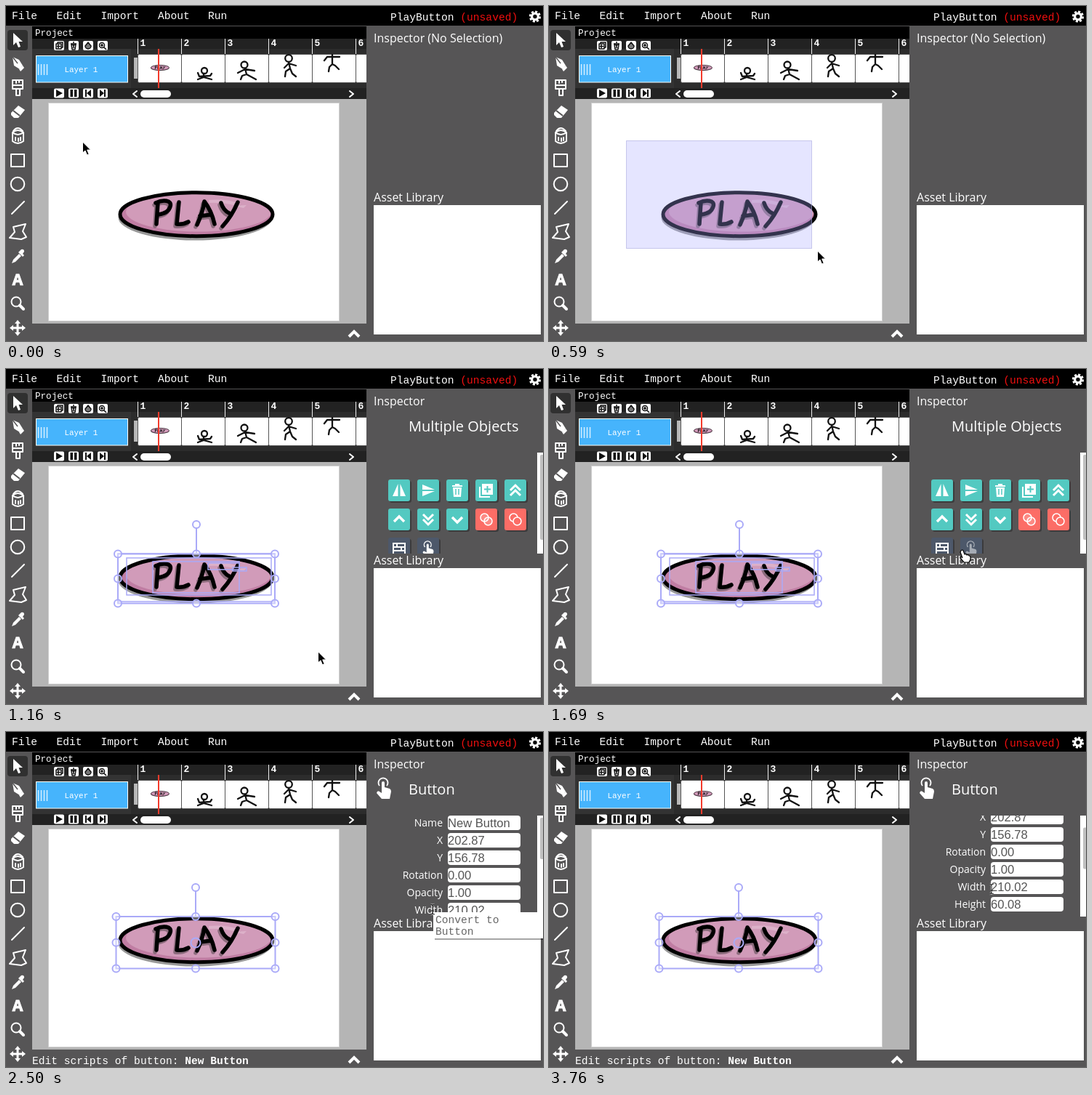
These frames come from a looping animation (739 by 461 pixels, 3880 ms). An HTML page:

```html
<!DOCTYPE html>
<html lang="en">
<head>
<meta charset="utf-8">
<title>Button editor</title>
<style>
html, body { margin: 0; width: 100%; height: 100%; overflow: hidden; background: #565556; }
svg { display: block; }
text { white-space: pre; }
.mono { font: 14.6px "Liberation Mono", monospace; fill: #fff; }
.sans { font: 16px "Open Sans", sans-serif; fill: #fff; }
.title { font-size: 20px; }
.label { font-size: 14px; text-anchor: end; }
.value { font: 16.6px "Liberation Sans", Arial, sans-serif; fill: #555; }
.num { font: bold 13px "Liberation Mono", monospace; fill: #fff; }
.line { fill: none; stroke: #fff; stroke-width: 2; stroke-linecap: round; stroke-linejoin: round; }
.dark { fill: none; stroke: #111; stroke-width: 1.5; stroke-linejoin: round; }
.stick { fill: none; stroke: #111; stroke-width: 2.3; stroke-linecap: round; stroke-linejoin: round; }
.sel { fill: none; stroke: #aaaaf8; stroke-width: 2; }
.thin { stroke-width: 1.5; }
</style>
</head>
<body>
<svg width="739" height="461" viewBox="0 0 739 461">
<defs>
  <clipPath id="panelClip"><rect x="500" y="115" width="239" height="139"/></clipPath>
  <clipPath id="frameClip"><rect x="172" y="66" width="324" height="40"/></clipPath>
  <clipPath id="faceClip"><ellipse cx="262" cy="286.700" rx="104" ry="29"/></clipPath>
  <g id="letters" fill="none" stroke-width="5.500" stroke-linecap="round" stroke-linejoin="round">
    <path d="M209 271L207 300M206 271C216 266 229 267 226 276C224 283 217 286 210 287"/>
    <path d="M238 270L235 300Q244 301 251 297"/>
    <path d="M263 301Q271 283 273 269Q283 282 287 300M267 289L283 287"/>
    <path d="M296 271Q299 281 307 285M319 270Q311 289 298 303"/>
  </g>
  <g id="logo">
    <ellipse cx="260.500" cy="291" rx="106" ry="31.500" fill="#999"/>
    <ellipse cx="262" cy="286.700" rx="105" ry="30" fill="#c07da3"/>
    <ellipse cx="265" cy="283" rx="100" ry="27.500" fill="#d19bb9" clip-path="url(#faceClip)"/>
    <path d="M279 267Q304 265 321 272L316 275Q300 270 279 271ZM313 275L331 274L327 278Z" fill="#dcb1c9"/>
    <ellipse cx="262" cy="286.700" rx="105" ry="30" fill="none" stroke="#000" stroke-width="5"/>
    <use href="#letters" x="-2" y="3" stroke="#8b6b7c"/>
    <use href="#letters" stroke="#000"/>
  </g>
  <g id="touch">
    <path d="M-3 1V-8Q-3-10-1-10T1-8V-2L8 0Q10 1 10 4L8 14H-3L-10 6Q-9 2-6 4L-3 6Z"/>
    <path d="M-6-4A6.5 6.5 0 1 1 4-4" fill="none" stroke="#fff" stroke-width="1.8"/>
  </g>
</defs>

<rect width="739" height="461" fill="#565556"/>
<rect width="739" height="27" fill="#000"/>
<g id="menu" class="mono"></g>
<text class="mono" x="529" y="20">PlayButton <tspan fill="#f00f0f">(unsaved)</tspan></text>
<g transform="translate(728 14.5)">
  <circle r="6.6" fill="none" stroke="#fff" stroke-width="3" stroke-dasharray="3 2.18"/>
  <circle r="4.3" fill="none" stroke="#fff" stroke-width="3.2"/>
</g>

<!-- toolbar -->
<rect x="2" y="33" width="28" height="28" rx="4" fill="#303030"/>
<g fill="#fff">
  <path d="M10 37V54L14 50L17 57L20 56L17.500 49H23Z"/>
  <path d="M9 70L18 74L23 82L19 87L11 82Z"/><path d="M9 70L16 79" stroke="#565556" stroke-width="1.5"/><path d="M18 87L23 82L25 85L20 90Z"/>
  <path d="M7 147L17 137L26 143L17 154H11L7 150Z"/><path d="M10 144L19 151" stroke="#565556" stroke-width="2"/>
  <path d="M8 354L10 349L18 341L21 344L13 352ZM17 339L20 342L23 345L25 343L23 341L25 338Q25 334 21 335L18 338Z"/>
  <path d="M16 432L20 437H17.500V441.500H22V439L27 443L22 447V444.500H17.500V449H20L16 454L12 449H14.500V444.500H10V447L5 443L10 439V441.500H14.500V437H12Z"/>
  <text x="16" y="384" text-anchor="middle" stroke="#fff" style="font:bold 21px 'Open Sans',sans-serif">A</text>
</g>
<g class="line">
  <path d="M9 102H23V114H9ZM9 109H23M14 114V123H19V114M14 102V106M18 102V105"/>
  <path d="M9 174V186Q16 192 24 186V174M9 174Q16 168 24 174Q16 180 9 174M10 172Q16 164 23 172M13 181V185M17 182V186M20 181V185"/>
  <rect x="7" y="204" width="18" height="17"/>
  <circle cx="16" cy="245" r="9.300"/>
  <path d="M8 286L25 269"/>
  <path d="M10 304L27 300L23 310L28 318L21 321L5 319L12 311Z"/>
  <circle cx="14" cy="407" r="6.500"/>
  <path d="M19 412L24 417" stroke-width="4"/>
</g>

<!-- timeline -->
<rect x="36" y="28" width="460" height="100" fill="#333"/>
<rect x="36" y="28" width="460" height="17" fill="#000"/>
<rect x="36" y="45" width="460" height="14" fill="#222"/>
<rect x="36" y="113" width="460" height="15" fill="#222"/>
<text class="mono" x="40" y="41" style="font-size:12.6px">Project</text>
<g id="tiles"></g>
<g class="dark">
  <path d="M69 52H76V59H69ZM71 52V50H78V57H76M72 53V58M70 55.500H75"/>
  <path d="M90 53L91 60H95L96 53ZM89 52H97M92 50H94M92 54L94 58M94 54L92 58"/>
  <path d="M113 50L117 55A4 4 0 1 1 109 55Z" fill="#777"/>
  <circle cx="132" cy="54" r="3.500"/><path d="M134.500 56.500L138 60M130 54H134M132 52V56"/>
</g>
<g fill="#111">
  <path d="M69 115L78 120L69 125ZM88.500 115H92V125H88.500ZM94 115H97.500V125H94ZM109 115H111V125H109ZM117 115V125L111 120ZM135 115H137V125H135ZM129 115V125L135 120Z"/>
</g>
<rect x="41.500" y="68.500" width="126" height="36.500" fill="#46b4fc" stroke="#fff"/>
<path d="M44.500 80V95M48.500 80V95M52.500 80V95M56.500 80V95" stroke="#d8efff" stroke-width="1.500"/>
<text class="mono" x="80.500" y="91" style="font-size:10.900px">Layer 1</text>
<rect x="172" y="59" width="324" height="54" fill="#2c2c2c"/>
<rect x="176" y="71" width="7" height="29" fill="#b8b8b8"/>
<g id="cells" clip-path="url(#frameClip)"></g>
<use href="#logo" transform="translate(180.500 50.500) scale(.12)"/>
<g class="stick" clip-path="url(#frameClip)">
  <circle cx="273" cy="89" r="4"/><path d="M272 93V97M264 92L266 97L281 96L283 93M264 101L272 98L283 101"/>
  <circle cx="328" cy="81" r="4.500"/><path d="M329 86L331 94M319 92L329 87L342 89M323 101L325 96L331 94L344 101"/>
  <circle cx="389" cy="72" r="4.800"/><path d="M389 77L391 86M383 85L389 79L399 82M384 97L385 90L391 86L394 93L399 97"/>
  <path d="M449 66V80M438 75L442 70H459M444 90L445 84L449 80L453 82L458 87"/>
</g>
<path d="M210 59V113" stroke="#f33b2c" stroke-width="2"/>
<g class="line">
  <path d="M180 117L175 121L180 125M473 117L478 121L473 125"/>
</g>
<rect x="185" y="116" width="42" height="10" rx="5" fill="#fff"/>

<!-- stage -->
<rect x="36" y="128" width="460" height="309" fill="#b5b5b5"/>
<rect x="58.500" y="133.500" width="400" height="300" fill="#fff" stroke="#d0d0d0"/>
<use href="#logo"/>
<rect id="band" fill="#aaf" fill-opacity=".3" stroke="#aaaae0" stroke-opacity=".6"/>
<g id="multiSel" class="sel">
  <g class="thin"><rect x="154" y="254" width="216" height="66"/><rect x="166" y="260" width="199" height="51"/><rect x="202" y="265" width="119" height="43"/><path d="M278 267H321V276H278ZM312 273H331V278H312Z"/></g>
</g>
<g id="buttonSel" class="sel"><circle cx="261" cy="290" r="6.500"/></g>
<path d="M472 455L479 448L486 455" fill="none" stroke="#fff" stroke-width="4"/>
<text id="scripts" class="mono" x="36" y="457">Edit scripts of button: <tspan font-weight="bold">New Button</tspan></text>

<!-- inspector -->
<text id="heading" class="sans" x="506" y="50"></text>
<g id="multiPanel">
  <text class="sans title" x="554" y="86">Multiple Objects</text>
  <g id="actions" clip-path="url(#panelClip)"></g>
</g>
<g id="buttonPanel">
  <use href="#touch" x="520" y="78" fill="#fff"/>
  <text class="sans title" x="554" y="86">Button</text>
  <g clip-path="url(#panelClip)"><g id="fields"></g></g>
</g>
<g id="scrollbar">
  <rect x="731" y="115" width="8" height="139" fill="#fff"/>
  <rect id="thumb" x="735" width="6" rx="2" fill="#c1c1c1"/>
</g>
<text class="sans" x="506" y="269">Asset Library</text>
<rect x="506" y="274" width="230" height="178" fill="#fff"/>
<g id="tip">
  <rect x="590" y="250" width="149" height="36" fill="#000" opacity=".35"/>
  <rect x="588" y="248" width="151" height="36" fill="#fff"/>
  <g class="mono" style="fill:#666"><text x="591" y="263">Convert to</text><text x="591" y="279">Button</text></g>
</g>
<path id="arrow" d="M-.5 0V15L3 12L5.500 18L8.200 17L5.700 11H10.500Z" fill="#000" stroke="#fff"/>
<path id="hand" d="M-2 1Q0-1 1 1L3 6Q5 5 6 7Q8 6 9 8Q11 8 11 10V13L9 17H2L-3 11Q-3 9-1 10L0 11L-3 3Z" fill="#fff" stroke="#000" stroke-width="1.200"/>
<g id="beam" fill="none"><path d="M-3-7Q0-7 0-5Q0-7 3-7M0-5V5M-3 7Q0 7 0 5Q0 7 3 7M-2 2H2" stroke="#fff" stroke-width="2.500" stroke-opacity=".45"/><path d="M-3-7Q0-7 0-5Q0-7 3-7M0-5V5M-3 7Q0 7 0 5Q0 7 3 7M-2 2H2" stroke="#111"/></g>
</svg>
<script>
const LOOP = 3880;
const $ = id => document.getElementById(id);
const add = (id, html) => $(id).insertAdjacentHTML('beforeend', html);
const show = (id, on) => { $(id).style.display = on ? '' : 'none'; };
const place = (id, x, y) => $(id).setAttribute('transform', `translate(${x} ${y})`);

for (const [x, s] of [[8, 'File'], [69.5, 'Edit'], [130.5, 'Import'], [209, 'About'], [278, 'Run']])
  add('menu', `<text x="${x}" y="18">${s}</text>`);

for (let i = 0; i < 4; i++)
  for (const y of [48, 113.5])
    add('tiles', `<rect x="${66 + 20 * i}" y="${y}" width="14" height="13" rx="2" fill="#fff"/>`);

for (let i = 0; i < 6; i++) {
  const x = 182 + 60 * i;
  add('cells', `<rect x="${x - .5}" y="66.5" width="60" height="39" rx="2" fill="#fff" stroke="#555"/>`);
  $('cells').insertAdjacentHTML('beforebegin',
    `<path d="M${x - .5} 45V66" stroke="#eee"/><text class="num" x="${x + 2.5}" y="55">${i + 1}</text>`);
}

function handles(id, x0, y0, x1, y1) {
  const cx = (x0 + x1) / 2, cy = (y0 + y1) / 2;
  add(id, `<path d="M${x0} ${y0}H${x1}V${y1}H${x0}ZM${cx} ${y0}V219"/>`);
  const spots = [[cx, 214]];
  for (const x of [x0, cx, x1])
    for (const y of [y0, cy, y1])
      if (x !== cx || y !== cy) spots.push([x, y]);
  for (const [x, y] of spots)
    add(id, `<circle cx="${x}" cy="${y}" r="5" fill="#fff" fill-opacity=".4"/>`);
}
handles('multiSel', 154, 254.5, 370, 322.5);
handles('buttonSel', 151.5, 254, 370.5, 325.5);

// Action icons are centred on 0,0.
const up = 'M-7 3L0-4L7 3', down = 'M-7-3L0 4L7-3';
const solid = d => `<path d="${d}" fill="#fff"/>`;
const line = (d, w = 3) => `<path d="${d}" fill="none" stroke="#fff" stroke-width="${w}"/>`;
const ring = (at, fill) => `<circle cx="${at}" cy="${at}" r="5.5" fill="${fill}" stroke="#fff" stroke-width="1.5"/>`;
const icons = [
  solid('M-1.5-9V8H-9ZM1.5-9V8H9Z'),
  solid('M-8-8L9-1H-8ZM-8 1H9L-8 8Z'),
  solid('M-7-7H-3V-9H3V-7H7V-5H-7ZM-6-4H6L5 9H-5Z') + '<path d="M-2-2V6M2-2V6" stroke="#53c9c1" stroke-width="1.5"/>',
  line('M-9-5V9H5', 2) + solid('M-6-9H9V6H-6Z') + '<path d="M1.500-6V3M-3-1.500H6" stroke="#53c9c1" stroke-width="2"/>',
  line('M-7 0L0-7L7 0M-7 7L0 0L7 7'),
  line(up, 3.5),
  line('M-7-7L0 0L7-7M-7 0L0 7L7 0'),
  line(down, 3.5),
  ring(-2.5, '#fff3') + ring(2.5, '#fff3'),
  ring(-2.5, 'none') + ring(2.5, '#fc6d66'),
  line('M-8-7H8V8H-8ZM-8-2H8M-8 3H8M-3-7V-2M3-2V3', 2),
  '<use id="hover" href="#touch" fill="#fff" transform="translate(0 1) scale(.75)"/>'
];
icons.forEach((icon, i) => {
  const x = 526 + 40 * (i % 5), y = 152 + 40 * Math.floor(i / 5);
  const color = i > 9 ? '#4d586a' : i > 7 ? '#fc6d66' : '#53c9c1';
  add('actions', `<rect x="${x + 2}" y="${y + 2}" width="30" height="30" rx="3" fill="#000" opacity=".3"/>
    <rect x="${x}" y="${y}" width="30" height="30" rx="3" fill="${color}"/>
    <g transform="translate(${x + 15} ${y + 15})">${icon}</g>`);
});

[['Name', 'New Button'], ['X', '202.87'], ['Y', '156.78'], ['Rotation', '0.00'],
 ['Opacity', '1.00'], ['Width', '210.02'], ['Height', '60.08']].forEach(([name, value], i) => {
  const y = 115 + 24 * i;
  add('fields', `<text class="sans label" x="601" y="${y + 15}">${name}</text>
    <rect x="608" y="${y}" width="100" height="20" rx="4" fill="#fff"/>
    <text class="value" x="608" y="${y + 16}">${value}</text>`);
});

// Rows of time, then values held until the next row.
const pointer = [
  [0, 106, 187], [60, 105.5, 187], [120, 105, 186], [290, 108, 188], [350, 130, 202],
  [410, 182, 234], [470, 260, 283], [530, 325, 317], [590, 370, 337], [650, 396, 353],
  [700, 412, 365], [760, 421, 376], [810, 426, 383], [870, 429, 387], [930, 430, 389],
  [1280, 431, 384], [1340, 436, 362], [1390, 446, 332], [1450, 470, 311], [1510, 500, 288],
  [1570, 530, 268], [1630, 553, 256], [1690, 569, 249], [1740, 579, 246], [1800, 585.5, 245],
  [2500, 587, 244], [3460, 588, 241], [3520, 591, 237], [3580, 596, 231], [3640, 602, 224],
  [3700, 607, 218], [3760, 609, 216]
];
const tipFade = [[0, 0], [1860, .35], [1920, .7], [1970, 1], [2680, .66], [2740, .33], [2800, 0]];
const scroll = [[0, 0], [3520, 3], [3580, 10], [3640, 20], [3700, 28], [3760, 32]];
const held = (rows, t) => rows.findLast(row => row[0] <= t).slice(1);

function draw(t) {
  const [x, y] = held(pointer, t);
  const [offset] = held(scroll, t);
  const multi = t >= 1050 && t < 2380, button = t >= 2380;

  const drag = t >= 290 && t < 1050;
  show('band', drag);
  if (drag) {
    const lag = t < 650 ? 1 : .4;
    const box = { x: 106.5, y: 185.5, width: Math.max(1, x - 106 - 9 * lag), height: Math.max(1, y - 185 - 4 * lag) };
    for (const key in box) $('band').setAttribute(key, box[key]);
  }

  show('multiSel', multi);
  show('multiPanel', multi);
  show('buttonSel', button);
  show('buttonPanel', button);
  show('scripts', button);
  show('scrollbar', multi || button);
  $('heading').textContent = multi || button ? 'Inspector' : 'Inspector (No Selection)';
  $('hover').setAttribute('opacity', t >= 1690 ? .5 : 1);
  place('fields', 0, -offset);
  $('thumb').setAttribute('y', 118 + offset * .42);
  $('thumb').setAttribute('height', button ? 57 : 117);
  $('tip').setAttribute('opacity', held(tipFade, t)[0]);

  const kind = t < 1690 ? 'arrow' : t < 2500 ? 'hand' : 'beam';
  for (const id of ['arrow', 'hand', 'beam']) show(id, id === kind);
  place(kind, x, y);
}

const start = performance.now();
function tick() {
  draw((performance.now() - start) % LOOP);
  requestAnimationFrame(tick);
}
tick();
</script>
</body>
</html>
```
